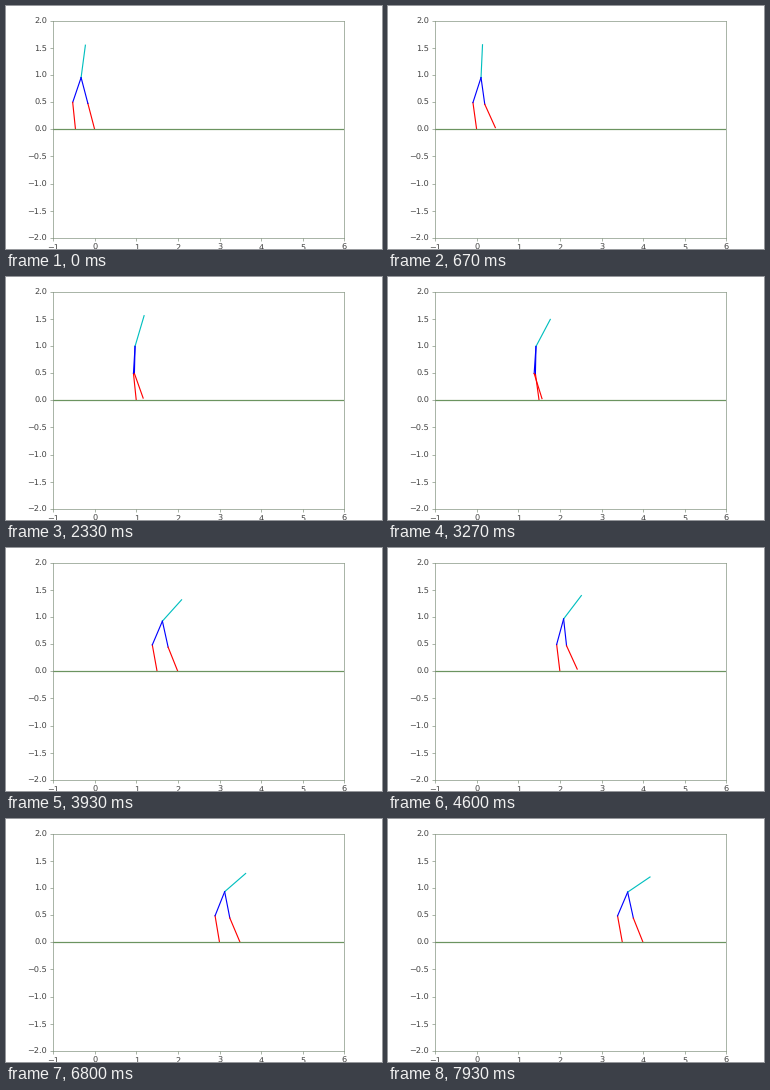
A matplotlib script that plays this animation: 376 px wide and 243 px high, repeating every 7.99 s.

```python
import numpy as np
import matplotlib.pyplot as plt
from matplotlib.animation import FuncAnimation

W, H, DPI = 376, 243, 58.75
LOOP_MS, FRAMES = 7990, 120
STEP_FRAMES, STRIDE = 15, 0.5
SEGMENT, TORSO = 0.5, 0.605
FRAME_COLOR, GROUND_COLOR, TEXT_COLOR = "#7f8f7c", "#6b9460", "#444444"

plt.rcParams["text.hinting"] = "none"


def lean(i, phase):
    """Torso angle: a slow forward sag plus a nod at every footfall."""
    sag = 23 + 30 * np.tanh((i - 38) / 34)
    nod = 11 * np.cos(np.pi * phase / STEP_FRAMES) ** 4
    return np.radians(sag + nod)


def knee(hip, foot):
    """Joint of two equal segments, bent backwards."""
    dx, dy = hip - foot
    dist = np.hypot(dx, dy)
    bend = np.sqrt(max(SEGMENT ** 2 - dist ** 2 / 4, 0))
    return (hip + foot) / 2 + bend * np.array([-dy, dx]) / dist


def pose(i):
    step, phase = divmod(i, STEP_FRAMES)
    t = phase / (STEP_FRAMES - 1)
    ease = 1 - (1 - t) ** 2.4

    stance = np.array([STRIDE * step, 0.0])
    hip = stance + [-0.325 + 0.453 * ease,
                    0.959 + 0.035 * np.cos(np.pi * (phase - 5) / 9)]
    swing = stance + [-0.46 + 0.957 * ease, 0.05 * np.sin(np.pi * t) ** 2]
    angle = lean(i, phase)
    head = hip + TORSO * np.array([np.sin(angle), np.cos(angle)])
    k1, k2 = knee(hip, stance), knee(hip, swing)
    return [(stance, k1), (k1, hip), (hip, head), (hip, k2), (k2, swing)]


fig = plt.figure(figsize=((W + 1e-4) / DPI, (H + 1e-4) / DPI), dpi=DPI,
                 facecolor="white")
ax = fig.add_axes([47 / W, 11.1 / H, 291.4 / W, 217.2 / H])
ax.set(xlim=(-1, 6), ylim=(-2, 2))
ax.tick_params(color=FRAME_COLOR, labelcolor=TEXT_COLOR)
ax.spines[:].set_color(FRAME_COLOR)
lines = [ax.plot([], [], color=c, lw=1.4)[0] for c in "rbcbr"]
ax.plot([-1, 6], [0, 0], color=GROUND_COLOR, lw=1.5)


def update(i):
    for line, ends in zip(lines, pose(i)):
        line.set_data(*np.transpose(ends))
    return lines


anim = FuncAnimation(fig, update, frames=FRAMES, interval=LOOP_MS / FRAMES,
                     repeat=True, repeat_delay=0)
plt.show()
```
